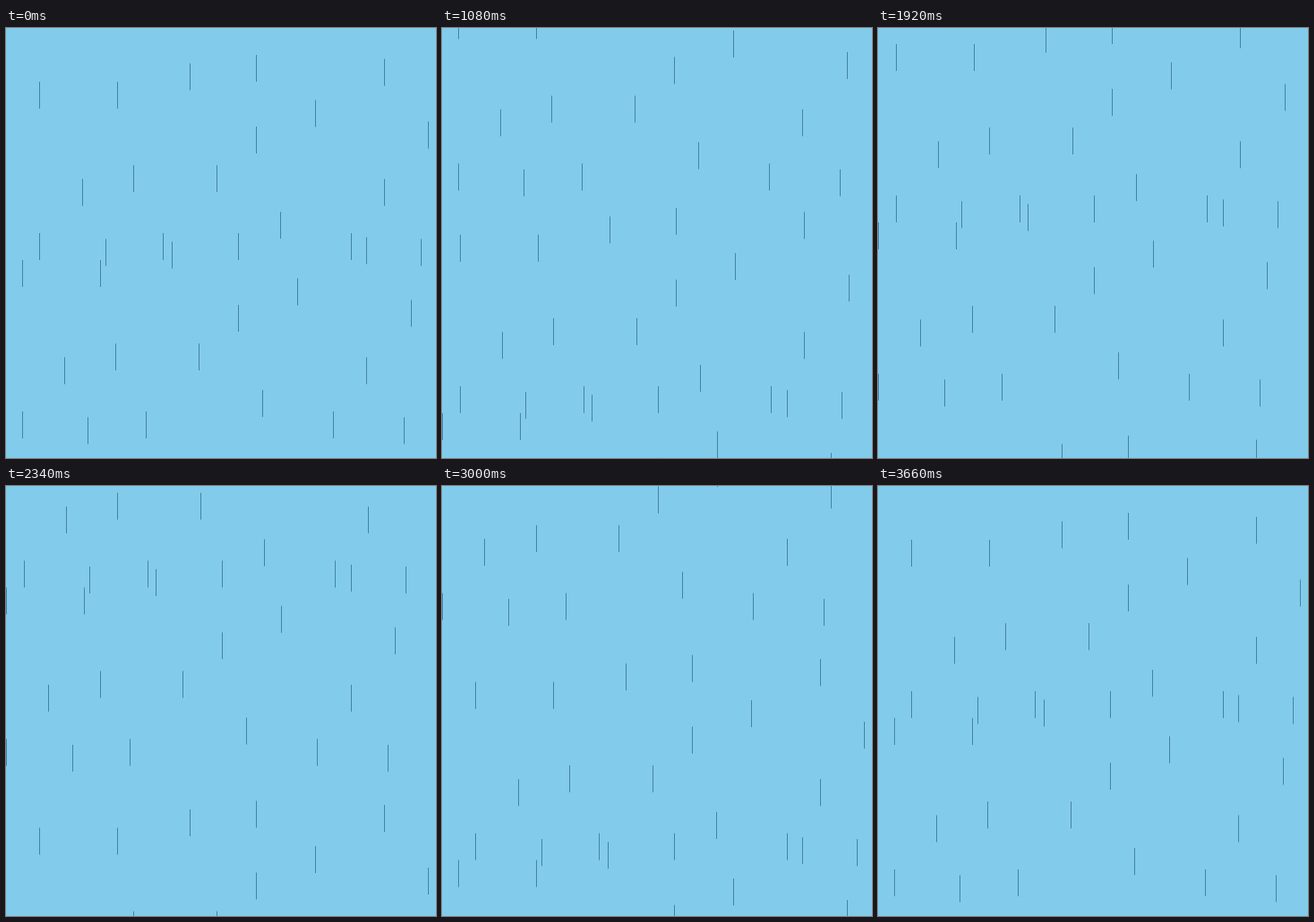
These frames come from a looping animation (480 px wide and 480 px high, 3.72 s). An HTML page with a canvas:

```html
<!DOCTYPE html>
<html lang="en">
<head>
<meta charset="utf-8">
<title>Rain</title>
<style>
  html, body { margin: 0; width: 100%; height: 100%; overflow: hidden; background: #83cbeb; }
  canvas { display: block; }
</style>
</head>
<body>
<canvas id="stage" width="480" height="480"></canvas>
<script>
const ctx = document.getElementById('stage').getContext('2d');
const SIZE = 480, STEP_MS = 60, STEPS = 62;
const PERIOD = 913.5, CLUSTER_END = -204, DROP_LENGTH = 30;
const SPEED = 14.8, FAST_STEPS = 26;

// One cluster of drops as rows: height, then the places along the row
const rows = [
  [-30, 241.4], [-25.5, 384.8], [-20.5, 167.4], [0, 0, 87], [20.5, 307.4],
  [44.5, 434], [50, 241.4], [93.2, 104.8, 197.4], [108.5, 47.4, 384.8],
  [145.2, 268.4], [169, 0, 138, 347.4], [175.5, 73.8, 426]
];

// Slightly faster at first, then steady until the period is complete
function scrollAt(step, pair) {
  const boost = 0.57 + 0.14 * pair;
  return Math.min(PERIOD, SPEED * step + boost * Math.min(step, FAST_STEPS));
}

function drawCluster(left, top) {
  for (const [y, ...places] of rows) {
    for (const x of places) {
      ctx.fillRect(Math.floor(left + x), top + y, 1, DROP_LENGTH);
    }
  }
}

function draw(ms) {
  const step = Math.floor(ms / STEP_MS) % STEPS;
  ctx.fillStyle = '#83cbeb';
  ctx.fillRect(0, 0, SIZE, SIZE);
  ctx.fillStyle = '#4583a3';

  // Two pairs of clusters, each one shifted left and down from the last
  for (let pair = 0; pair < 2; pair++) {
    for (let half = 0; half < 2; half++) {
      const left = 37.7 - 17.7 * pair - 19.7 * half;
      const top = 60 + 450 * pair + 199 * half - scrollAt(step, pair);
      drawCluster(left, top < CLUSTER_END ? top + PERIOD : top);
    }
  }
}

const begin = performance.now();
function tick() {
  draw(performance.now() - begin);
  requestAnimationFrame(tick);
}
tick();
</script>
</body>
</html>
```
